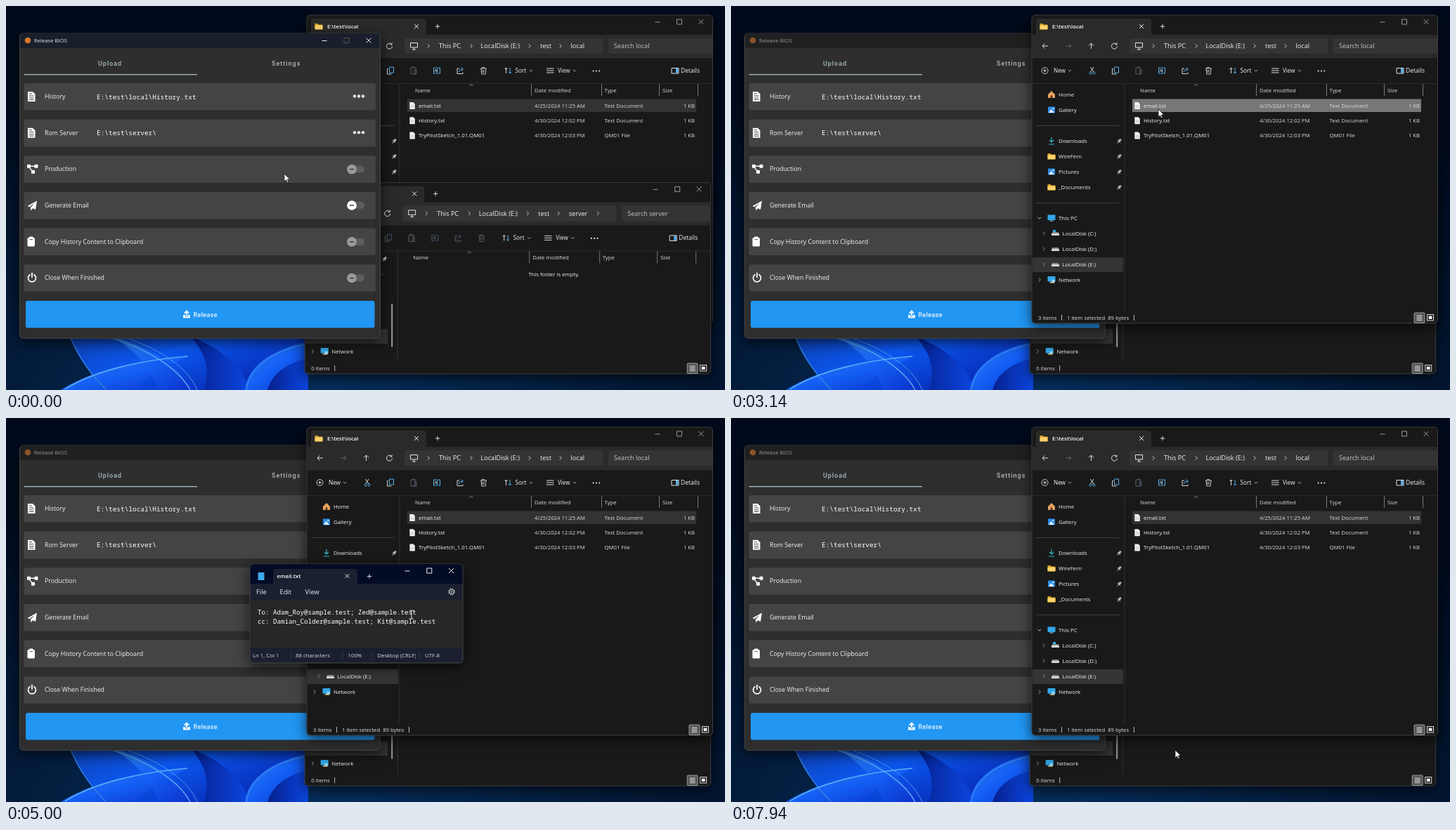
An HTML page for the animation above (8 s loop, 1023 px wide and 547 px high).

```html
<!DOCTYPE html>
<html lang="en">
<head>
<meta charset="utf-8">
<title>Desktop release tool</title>
<style>
html, body { margin: 0; width: 100%; height: 100%; overflow: hidden; background: #020d20; }
svg { display: block; width: 100vw; height: 100vh; }
text { font-family: "Open Sans", "Noto Sans", sans-serif; white-space: pre; }
.mono { font-family: "Noto Sans Mono", "DejaVu Sans Mono", monospace; }
.tab { font-family: Roboto, sans-serif; font-weight: 500; }
.semi { font-weight: 600; }
.win { filter: drop-shadow(0 5px 9px #000a); }
</style>
</head>
<body>
<svg id="stage" viewBox="0 0 1023 547"></svg>
<script>
// Drawing helpers; text is placed by its vertical middle.
const T = (x, y, s, size = 7.85, fill = '#f2f2f2', more = '') =>
  `<text x="${x}" y="${y + size * .36}" font-size="${size}" fill="${fill}" ${more}>${s}</text>`;
const R = (x, y, w, h, fill, r = 0, more = '') =>
  `<rect x="${x}" y="${y}" width="${w}" height="${h}" rx="${r}" fill="${fill}" ${more}/>`;
const C = (x, y, r, fill, more = '') => `<circle cx="${x}" cy="${y}" r="${r}" fill="${fill}" ${more}/>`;
const P = (d, fill, more = '') => `<path d="${d}" fill="${fill}" ${more}/>`;
const L = (d, color = '#e4e4e4', w = 1, more = '') => P(d, 'none', `stroke="${color}" stroke-width="${w}" ${more}`);
const G = (x, y, s, more = '') => `<g transform="translate(${x} ${y})" ${more}>${s}</g>`;

// Small icons
const right = (x, y, c = '#ccc') => L(`M${x - 1.3} ${y - 2.7}l2.7 2.7-2.7 2.7`, c);
const down = (x, y, c = '#bbb') => L(`M${x - 2.2} ${y - 1}l2.2 2.2 2.2-2.2`, c, .9);
const cross = (x, y, r = 3, c = '#eee') => L(`M${x - r} ${y - r}l${2 * r} ${2 * r}m0 ${-2 * r}l${-2 * r} ${2 * r}`, c);
const plus = (x, y, r = 3.2, c = '#ddd') => L(`M${x - r} ${y}h${2 * r}m${-r} ${-r}v${2 * r}`, c);
const dots = (x, y, gap, r) => [-1, 0, 1].map(i => C(x + i * gap, y, r, '#e4e4e4')).join('');
const buttons = (x, y, gap, mid, c) =>
  L(`M${x - 3.5} ${y + .5}h7`, c) + L(`M${x + gap - 3.5} ${y - 3.5}h7v7h-7z`, mid) + cross(x + 2 * gap, y, 3.5, c);
const folder = (x, y) => P(`M${x - 5.5} ${y - 4}h4l1.5 1.5h5.5v7h-11z`, '#d9a02c') + R(x - 5.5, y - 1.5, 11, 5.7, '#ffd36b', .8);
const sheet = (x, y) => P(`M${x - 3.6} ${y - 5}h5l2.4 2.4v7.6h-7.4z`, '#f1f1f1') + L(`M${x - 2} ${y}h4m-4 2h4`, '#aaa', .7);
const photo = (x, y) => R(x - 5, y - 4.5, 10, 9, '#2b8ce6', 1) + P(`M${x - 4} ${y + 4}l3.5-5 4.5 5z`, '#eaf5ff') + C(x + 2.4, y - 2, 1, '#fff');
const screen = (x, y) => R(x - 5.5, y - 4.5, 11, 7.5, '#31a8ea', .8) + R(x - 2.5, y + 3.6, 5, 1, '#a9d6ee');
const drive = (x, y) => P(`M${x - 4} ${y - 2}h8l1.5 2.5h-11z`, '#8b8b8b') + R(x - 5.5, y, 11, 3, '#d6d6d6', .6);
const network = (x, y) => screen(x, y - .5) + C(x + 2.5, y + 2, 2.6, '#8fd3f5') + R(x - 2, y + 3.5, 6, 1.2, '#d8b04c');
const pin = (x, y) => G(x, y, P('M-1-3.5h3v3l1.5 1.6h-6l1.5-1.6z', '#b5b5b5') + L('M.5 1v3', '#b5b5b5'), '').replace(')"', ') rotate(42)"');

function wallpaper() {
  const petal = (d, fill) => P(d, `url(#${fill})`);
  return `<defs>
    <radialGradient id="sky" cx=".42" cy="1.05" r=".9"><stop offset="0" stop-color="#06305f"/><stop offset=".5" stop-color="#031a38"/><stop offset="1" stop-color="#020b1d"/></radialGradient>
    <linearGradient id="blue" x2="1" y2=".6"><stop offset="0" stop-color="#0d3fae"/><stop offset=".45" stop-color="#0b57f0"/><stop offset="1" stop-color="#0726ae"/></linearGradient>
    <linearGradient id="light" x2="1" y2="1"><stop offset="0" stop-color="#2d7fe6"/><stop offset=".5" stop-color="#1460f5"/><stop offset="1" stop-color="#0a30c8"/></linearGradient>
    <linearGradient id="deep" x2="1"><stop offset="0" stop-color="#06208e"/><stop offset="1" stop-color="#0b46e0"/></linearGradient>
    </defs>` + R(0, 0, 1023, 547, 'url(#sky)') +
    petal('M90 470C106 510 126 530 142 547H430V470z', 'blue') +
    petal('M78 547C120 520 190 502 262 498C230 512 200 528 184 547z', 'light') +
    petal('M150 470C200 484 250 512 270 547H216C206 512 180 488 150 470z', 'light') +
    petal('M262 470C310 490 338 515 346 547H282C290 520 286 496 262 470z', 'deep') +
    petal('M340 547C342 518 372 490 430 478V547z', 'light') +
    petal('M372 547C378 524 400 508 430 502V547z', 'deep') +
    L('M92 473C108 508 124 528 142 546', '#3b86dc', 1.2) +
    L('M150 473C200 488 246 516 262 547M84 546C124 520 190 505 258 499', '#62b4f5', 1.3) +
    L('M172 473C226 492 260 518 272 547M342 547C346 516 376 492 426 482', '#4b9af2', 1);
}

// Navigation pane shared by both file windows
function sidebar(edge, selected) {
  const s = [];
  const item = (y, icon, name, deep = 0) => s.push(icon(456 + deep, y), T(466 + deep, y, name));
  s.push(R(429, 358, selected, 21, '#343434', 2));
  item(126, (x, y) => P(`M${x - 5} ${y}l5-5 5 5v5h-10z`, '#e8a15c') + R(x - 1.3, y + 1.5, 2.6, 3.5, '#4b3424'), 'Home');
  item(148, photo, 'Gallery');
  item(192, (x, y) => L(`M${x} ${y - 5}v7m-3-3l3 3 3-3m-7 6h8`, '#35b6c4', 1.2), 'Downloads');
  item(214, folder, 'WireFern');
  item(236, photo, 'Pictures');
  item(258, folder, '_Documents');
  item(302, screen, 'This PC');
  ['C', 'D', 'E'].forEach((d, i) => {
    const y = 324 + 22 * i;
    item(y, drive, `LocalDisk (${d}:)`, 5.5);
    s.push(right(445, y, '#888'));
  });
  s.push(R(458, 319, 4, 3, '#31a8ea'), down(439, 302, '#ddd'), right(439, 390, '#999'));
  item(390, network, 'Network');
  for (const y of [192, 214, 236, 258]) s.push(pin(edge, y));
  s.push(L(`M434 170.5H${edge}M434 280.5H${edge}`, '#3f3f3f'));
  return s.join('');
}

// File window in the place of the upper one; the caller shifts it.
function explorer(o) {
  const { name, bottom, field, side } = o, dim = o.empty ? '#5e5e5e' : '#d5d5d5';
  const blue = o.empty ? '#42556a' : '#58aee8';
  const crumbs = [[616, 'This PC', 662], [675.5, 'LocalDisk (E:)', 745], [760, 'test', 789], [803.5, name, o.empty ? 845 : 0]];
  return R(428, 13, 577.5, bottom - 13, '#191919', 5, 'stroke="#3c3c3c"') +
    R(434, 18, 164, 27, '#2a2a2a', 4) + R(428.5, 41, 576.5, 32, '#2a2a2a') +
    folder(445, 29) + T(457, 29, `E:\\test\\${name}`, 7.8, '#fff', 'class="semi"') +
    cross(584, 29) + plus(614, 29) + buttons(927, 22.5, 31, '#999', '#999') +
    L('M451 57h-8m3.5-3.5l-3.5 3.5 3.5 3.5M512.500 61v-8m-3.500 3.500l3.500-3.500 3.500 3.500', '#e0e0e0') +
    L('M476 57h8m-3.500-3.500l3.500 3.500-3.500 3.500', '#666') +
    L('M548.500 54.500a4 4 0 1 0 1 3m-.5-5v2.500h-2.500') +
    R(567, 46, field, 22, '#343434', 3) + R(567 + field + 8, 46, 430 - field, 22, '#343434', 3) +
    R(1004.6, 43, 3, 28, '#2a2a2a', 0, 'opacity="0"') +
    L('M575.500 52.500h10v6.500h-10zm2.500 9.500h5m-2.500-3v3') + right(601, 57) +
    crumbs.map(([x, s, c]) => T(x, 57, s, 9.15) + (c ? right(c, 57) : '')).join('') +
    T(573 + field + 10, 57, 'Search ' + name, 9.1, '#c8c8c8') +
    // command bar
    C(446.500, 92, 4.500, 'none', 'stroke="#ddd" stroke-width=".9"') + plus(446.500, 92, 2.2) + T(459, 92, 'New', 8.2) + down(482, 92) +
    L('M511.500 87l4.500 7m0-7l-4.500 7', dim) + C(511.500, 95.500, 1.600, 'none', `stroke="${blue}"`) + C(516.500, 95.500, 1.600, 'none', `stroke="${blue}"`) +
    L('M545.500 87h6v8h-6z', blue) + L('M544 89.500h-1.500v7.500h6', dim) +
    L('M576 88h7v9h-7zm2-1h3', '#5e5e5e') + L('M581 91h3v6h-3z', '#42556a') +
    L('M612 88h-3.500v8h3.500m3-8h2.500v8h-2.500m-1.500-9v10', blue) + L('M610 94l1.500-4 1.500 4', dim, .8) +
    L('M645 89h-3v7.500h8v-2', dim) + L('M644.500 94c0-3 2-4 5-4m-2-2.500l3 2.500-3 2.500', blue) +
    L('M675 89h9m-8 0l.8 8h5.400l.8-8m-5.500 0v-1.500h3v1.500m-2.500 2v4m2 0v-4', dim, .9) +
    L('M711.500 96v-8m-2 2l2-2 2 2', '#ddd') + L('M717 88v8m-2-2l2 2 2-2', '#58aee8') + T(724.500, 92, 'Sort', 8.3) + down(747, 92) +
    L('M769 89h10.500m-10.500 3h10.500m-10.500 3h10.500', '#ddd') + T(785, 92, 'View', 8.100) + down(809, 92) +
    dots(840, 92.500, 4.300, 1.100) + L('M947 88.500h10v7.500h-10z') + R(953, 89, 3.500, 6.500, '#58aee8') + T(960, 92, 'Details', 8.500) +
    L('M428.500 73.500H1005', '#303030') + L('M428.500 110.500H1005', '#2c2c2c') +
    // list heading
    L(`M560 111V${bottom - 17}`, '#333') + L('M747.500 111v17m100-17v17m82-17v17m55-17v17', '#777') +
    L('M659.500 113.500l2.500-2 2.500 2', '#aaa', .8) +
    [[582, 'Name'], [752, 'Date modified'], [851.500, 'Type'], [934, 'Size']].map(([x, s]) => T(x, 120, s, 7.8, '#ddd')).join('') +
    o.list + `<svg x="428" y="111" width="132" height="${bottom - 129}" viewBox="428 111 132 ${bottom - 129}">${side}</svg>` +
    // status bar
    T(437, bottom - 8, o.status, 7.8, '#e0e0e0') + o.bars.map(x => L(`M${x} ${bottom - 12}v8`, '#bbb')).join('') +
    R(972, bottom - 15, 15, 14.500, '#555', 1, 'stroke="#999"') + L(`M975.500 ${bottom - 11}h8m-8 2.200h8m-8 2.200h8m-8 2.200h8`, '#eee', .9) +
    R(990.500, bottom - 12.500, 9, 8.500, '#111', 0, 'stroke="#ddd"') + R(992.500, bottom - 10.500, 5, 4.500, '#eee');
}

const files = [['email.txt', '4/25/2024 11:25 AM', 'Text Document'], ['History.txt', '4/30/2024 12:02 PM', 'Text Document'],
  ['TryPilotSketch_1.01.QM01', '4/30/2024 12:03 PM', 'QM01 File']];
const fileRows = R(571, 132.500, 411, 18.500, '#333', 1, 'id="row"') + files.map(([n, d, k], i) => {
  const y = 142 + 21.2 * i;
  return sheet(578, y) + T(587, y, n) + T(752, y, d, 7.7, '#ddd') + T(851.500, y, k, 7.8, '#ddd') +
    T(980, y, '1 KB', 7.7, '#ddd', 'text-anchor="end"');
}).join('');

const toggle = (y, thumb) => R(485, y - 5, 25, 10, '#5d5d5d', 5) + C(492, y, 6.800, thumb) + L(`M489 ${y}h6`, '#333', 1.4);
const documentIcon = (x, y) => P(`M${x - 5} ${y - 7}h7l3.500 3.500v10.500h-10.500z`, '#fff') + L(`M${x - 3} ${y - 4}h4m-4 3h6.500m-6.500 3h6.500m-6.500 2.500h6.500`, '#444', 1);

function app() {
  const rows = [['History', 'E:\\test\\local\\History.txt'], ['Rom Server', 'E:\\test\\server\\'],
    ['Production'], ['Generate Email'], ['Copy History Content to Clipboard'], ['Close When Finished']];
  const icons = [documentIcon, documentIcon,
    (x, y) => L(`M${x - 4} ${y - 4}h10m-9 1l5 7`, '#fff', 1.4) + R(x - 6, y - 6.500, 5, 5, '#fff', 1) + R(x + 4.500, y - 6.500, 5, 5, '#fff', 1) + R(x, y + 1.500, 5, 5, '#fff', 1),
    (x, y) => P(`M${x - 5.500} ${y + 1}l13.500-7.500-2 12.500-4-1.700-2.500 3-.8-4 6-6.500-7.500 5.500z`, '#fff'),
    (x, y) => R(x - 5.500, y - 5.500, 10.500, 12.500, '#fff', 1.5) + R(x - 3, y - 7, 5.500, 3.500, '#fff', 1) + L(`M${x - 2.500} ${y - 3}h4.500`, '#444', .9),
    (x, y) => L(`M${x - 2} ${y - 4.500}a5.500 5.500 0 1 0 6 0M${x + 1} ${y - 7}v6`, '#fff', 1.700, 'stroke-linecap="round"')];
  return R(19.500, 39, 513, 434.500, '#2e2e2e', 5, 'stroke="#434343"') +
    P('M20 60V44a5 5 0 0 1 5-5H527a5 5 0 0 1 5 5V60z', '#191f2b', 'id="bar"') +
    C(31, 49, 4.300, '#d9772f', 'id="mark"') + T(40, 49, 'Release BIOS', 7.700, '#e8e8e8', 'id="title"') +
    buttons(453, 49, 31.500, '#555', '#eee') +
    T(131, 81.500, 'Upload', 9, '#a8bac6', 'class="tab" letter-spacing=".95"') +
    T(378, 81.500, 'Settings', 9, '#b4b8ba', 'class="tab" letter-spacing="1"') + R(25.500, 97, 246.500, 1.300, '#a9bcc8') +
    rows.map(([s, path], i) => {
      const y = 129 + 51.650 * i;
      return R(25.500, y - 19, 500.500, 38.500, '#444', 3) + icons[i](36, y) + T(55, y, s, 8.800, '#f4f4f4') +
        (path ? T(129, y + .3, path, 9.450, '#fff', 'class="mono" font-weight="500"') + dots(502, y - .5, 6, 2.200) :
          i == 3 ? '' : toggle(y + .3, '#9b9b9b'));
    }).join('') +
    R(485, 279, 25, 10, '#5d5d5d', 5, 'id="track"') +
    G(0, 0, C(0, 0, 14, '#fff', 'id="halo" opacity="0"') + C(0, 0, 6.800, '#fff', 'id="knob"') +
      L('M-3 0h6', '#333', 1.4, 'id="minus"') + L('M-3 .2l2.200 2.200 4-4.500', '#fff', 1.3, 'id="check"'), 'id="thumb"') +
    R(28, 420, 496.500, 38.500, '#2196f3', 3) +
    L('M257 441v-6m-3.200 2.800l3.200-3.300 3.200 3.300', '#e8f5ff', 2) + P('M252 440h3.500v2h3v-2h3.500v4.500h-10z', '#e8f5ff') +
    T(266.500, 439.500, 'Release', 9, '#e8f5ff', 'class="tab" letter-spacing=".35"');
}

function notepad() {
  const status = [[351, 'Ln 1, Col 1'], [412, '88 characters'], [486.500, '100%'], [596, 'UTF-8']];
  return R(347, 208, 303, 141, '#1a2030', 5, 'stroke="#4a4a4a"') +
    P('M347.500 236V213a5 5 0 0 1 5-5H644.500a5 5 0 0 1 5 5V236z', '#040b25') +
    P('M380 237V219a4 4 0 0 1 4-4H496a4 4 0 0 1 4 4V237z', '#1a2030') +
    P('M619 228.500V208H644.500a5 5 0 0 1 5 5V228.500z', '#c42b1c', 'id="red"') +
    R(358.500, 220, 9, 11, '#3fa9ea') + T(385.500, 225.500, 'email.txt', 7.900, '#fff', 'class="semi"') +
    cross(485.500, 225, 2.800) + plus(517, 225.500) + buttons(571, 217.500, 31.300, '#eee', '#eee') +
    [[356, 'File'], [389.500, 'Edit'], [425.500, 'View']].map(([x, s]) => T(x, 248, s, 9.300)).join('') +
    C(634, 247.500, 3.800, 'none', 'stroke="#ddd" stroke-width="1.500" stroke-dasharray="2 .98"') + C(634, 247.500, 3.400, '#1a2030', 'stroke="#ddd" stroke-width=".8"') + C(634, 247.500, 1.200, 'none', 'stroke="#ddd" stroke-width=".8"') +
    R(347.500, 259, 302, 68, '#272727') +
    T(358, 276.500, 'To: Adam_Roy@sample.test; Zed@sample.test', 9.180, '#fff', 'class="mono"') +
    T(358, 289.500, 'cc: Damian_Colder@sample.test; Kit@sample.test', 9.180, '#fff', 'class="mono"') +
    R(357.300, 270, 1, 13, '#fff', 0, 'id="caret"') +
    status.map(([x, s]) => T(x, 338, s, 7.800, '#ddd')).join('') +
    `<svg x="528" y="328" width="55" height="20" viewBox="528 328 55 20">${T(528.500, 338, 'Desktop (CRLF)', 7.900, '#ddd')}</svg>` +
    L('M406 332v12m73-12v12m42-12v12m67-12v12', '#30374a');
}

const win = (id, s, x = 0, y = 0) => G(x, y, s, `id="${id}" class="win"`);
const upper = explorer({ name: 'local', bottom: 452, field: 282, list: fileRows, side: sidebar(552, 129),
  status: '3 items', bars: [470.500, 573.500] }) + T(478, 444, '1 item selected  89 bytes', 7.700, '#e0e0e0');
const lower = explorer({ name: 'server', bottom: 285.600, field: 304, empty: true,
  list: T(746, 143.800, 'This folder is empty.', 7.750), side: G(0, -136.400, sidebar(541, 117)) + R(551, 185.500, 2, 62, '#9a9a9a', 1),
  status: '0 items', bars: [470.500] });

stage.innerHTML = wallpaper() +
  `<g id="stack">${win('local', upper)}${win('server', lower, -2.800, 238.400)}${win('tool', app())}</g>` +
  win('note', notepad()) +
  `<g id="cursor">
    ${P('M0 0V11L2.600 8.700 4.300 12.600 6 11.800 4.300 8H7.800Z', '#fff', 'id="arrow" stroke="#111" stroke-width=".7"')}
    ${P('M-1.200 0a1.300 1.300 0 0 1 2.600 0V4.500l4.400 1.200q1.500.5 1.400 2l-.7 4-1.200 2.300h-5l-3.600-5q-.6-1.700 1-1.500l1.100 1z', '#fff', 'id="hand" stroke="#111" stroke-width=".8"')}
    ${L('M-2.500-6h2l.5.600.5-.6h2M0-5.400V5.400M-2.500 6h2l.5-.6.5.600h2', '#eee', 1, 'id="beam"')}
  </g>`;

const $ = Object.fromEntries([...stage.querySelectorAll('[id]')].map(e => [e.id, e]));
const set = (id, name, value) => $[id].setAttribute(name, value);
const show = (id, on) => set(id, 'visibility', on ? 'visible' : 'hidden');
const ramp = (t, from, to) => Math.min(1, Math.max(0, (t - from) / (to - from)));

// Pointer route: time, x, y
const route = [[0, 396, 239], [780, 396, 239], [920, 448, 295], [990, 475, 314], [1060, 488, 298], [1130, 491, 284],
  [1820, 491, 284], [2170, 570, 172], [2400, 603, 148], [2530, 608, 147], [3400, 608, 147], [3470, 602, 148], [3730, 602, 148],
  [4000, 480, 262], [4430, 372, 300], [4650, 349, 290], [4780, 390, 280], [5000, 577, 280], [5060, 577, 280],
  [5270, 420, 300], [5550, 372, 290], [5900, 610, 293], [6090, 599, 228], [6370, 634, 216], [7200, 634, 216],
  [7810, 590, 449], [7940, 632, 473], [8000, 632, 473]];

function pointer(t) {
  const i = route.findIndex(p => p[0] > t), [a, x, y] = route[i - 1], [b, u, v] = route[i], k = (t - a) / (b - a);
  return [x + (u - x) * k, y + (v - y) * k];
}

let front;
function draw() {
  const t = performance.now() % 8000, [x, y] = pointer(t);

  const raised = t >= 2930;
  if (raised !== front) {
    front = raised;
    raised ? $.stack.append($.local) : $.stack.prepend($.local);
    set('bar', 'fill', raised ? '#202020' : '#191f2b');
    set('title', 'fill', raised ? '#999' : '#e8e8e8');
    set('mark', 'opacity', raised ? .6 : 1);
  }

  const k = ramp(t, 1400, 1520), on = k > .5;
  set('thumb', 'transform', `translate(${492 + 11 * k} 284)`);
  set('knob', 'fill', on ? '#2196f3' : '#fff');
  set('track', 'fill', on ? '#3d6c90' : '#5d5d5d');
  show('minus', !on);
  show('check', on);
  set('halo', 'opacity', .09 * ramp(t, 1400, 1520) * (1 - ramp(t, 1820, 2000)));

  const open = ramp(t, 3190, 3390) * (1 - ramp(t, 7030, 7190)), size = .9 + .1 * (1 - (1 - open) ** 3);
  set('note', 'opacity', open);
  set('note', 'transform', `translate(498.500 278.500) scale(${size}) translate(-498.500 -278.500)`);
  $.note.style.display = open ? '' : 'none';
  $.caret.style.opacity = Math.floor((t - 3390) / 530) % 2 ? 0 : 1;
  $.red.style.opacity = x > 619 && x < 650 && y > 208 && y < 229 ? 1 : 0;
  set('row', 'fill', x > 571 && x < 982 && y > 132 && y < 151.500 ? '#777' : '#333');

  const beam = open > 0 && x > 347 && x < 650 && y > 259 && y < 327, hand = t > 1100 && t < 1860;
  set('cursor', 'transform', `translate(${x} ${y})`);
  show('beam', beam);
  show('hand', hand);
  show('arrow', !beam && !hand);
  requestAnimationFrame(draw);
}
draw();
</script>
</body>
</html>
```
